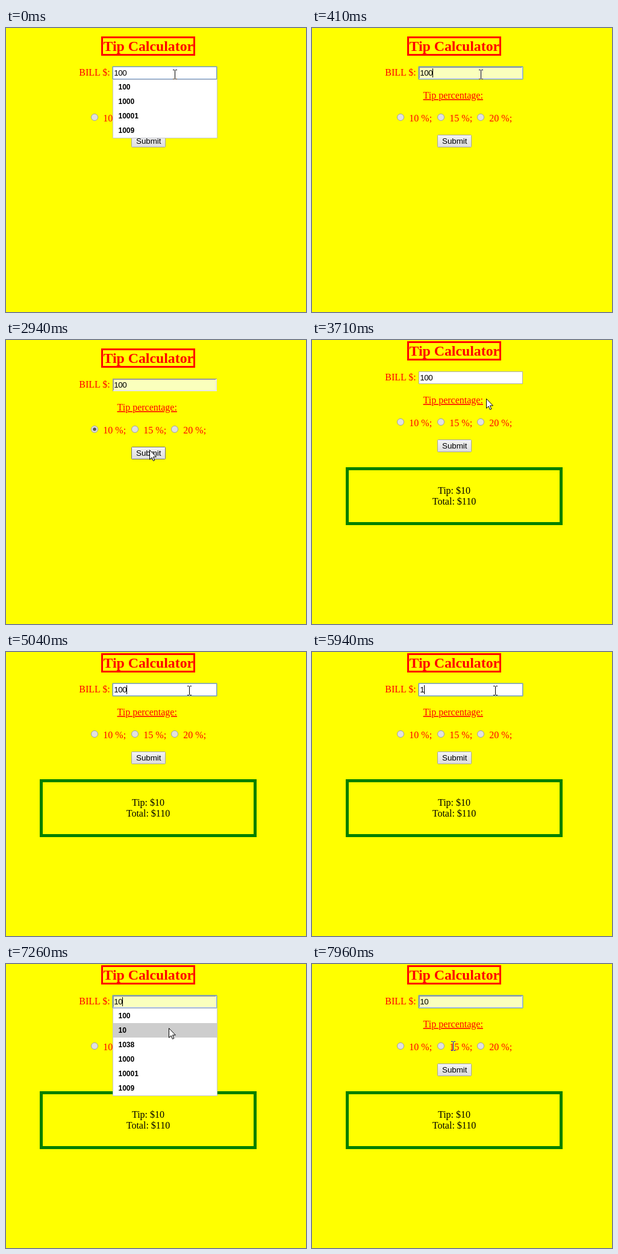
Recreate the animation shown at these times as an HTML page. Size 498x471 px, loop 8000 ms.

```html
<!DOCTYPE html>
<html lang="en">
<head>
<meta charset="utf-8">
<title>Tip Calculator</title>
<style>
  html, body { margin: 0; width: 100%; height: 100%; overflow: hidden; background: #ff0; }
  svg { display: block; isolation: isolate; }
  text { white-space: pre; }
  .serif { font: 16px "Liberation Serif", "Times New Roman", serif; fill: #f00; }
  .title { font-size: 23.8px; font-weight: bold; text-anchor: middle; }
  .dark { fill: #000; text-anchor: middle; }
  .sans { font: 13.33px "Liberation Sans", Arial, sans-serif; }
  .item { font-size: 12px; font-weight: bold; }
  #value { letter-spacing: -.4px; }
  #beam { mix-blend-mode: difference; }
</style>
</head>
<body>
<svg width="498" height="471" viewBox="0 0 498 471">
  <defs>
    <linearGradient id="face" x2="0" y2="1">
      <stop offset="0" stop-color="#f4f4f4"/><stop offset="1" stop-color="#dcdcdc"/>
    </linearGradient>
  </defs>
  <rect width="498" height="471" fill="#ff0"/>
  <g id="page">
    <rect x="159.5" y="15.5" width="153" height="29" fill="none" stroke="#f00" stroke-width="3"/>
    <text class="serif title" x="236.3" y="38">Tip Calculator</text>
    <text class="serif" x="121.3" y="79">BILL $:</text>
    <rect id="field" x="177.5" y="64.5" width="172" height="20" stroke="#a9abb2"/>
    <g id="inset" fill="none" stroke-width="2">
      <path d="M178 85V65H350" stroke="#9a9a9a"/>
      <path d="M178 84H349V65" stroke="#e8e8e4"/>
    </g>
    <g id="ring" fill="none" stroke="#5b94dc">
      <rect x="176.5" y="63.5" width="174" height="22" rx="1" stroke-opacity=".5"/>
      <rect x="177.5" y="64.5" width="172" height="20" stroke-opacity=".6"/>
    </g>
    <text id="value" class="sans" x="179.3" y="79"></text>
    <rect id="caret" y="67" width="1" height="15"/>
    <text class="serif" x="184.5" y="117" text-decoration="underline">Tip percentage:</text>
    <g id="radios"></g>
    <rect id="button" x="208.5" y="177.5" width="56" height="20" rx="1" fill="url(#face)"/>
    <text class="sans" x="216" y="192">Submit</text>
  </g>
  <g id="result">
    <rect x="58.5" y="213.5" width="355" height="91" fill="none" stroke="#008000" stroke-width="5"/>
    <text class="serif dark" x="236" y="255">Tip: $10</text>
    <text class="serif dark" x="236" y="273">Total: $110</text>
  </g>
  <g id="menu">
    <rect id="panel" x="177.5" y="85.5" width="173" fill="#fff" stroke="#c3c5cc"/>
    <rect id="mark" x="178" width="172" height="24" fill="#cdcdcd"/>
    <g id="items"></g>
  </g>
  <path id="beam" d="M-3.5 -7.5H-1L0 -6.5L1 -7.5H3.5M0 -7V7M-3.5 7.5H-1L0 6.5L1 7.5H3.5" fill="none" stroke="#fff"/>
  <path id="arrow" d="M.5 .5V16.2L4.1 12.8L6.4 18.4L8.8 17.4L6.5 11.9H11.4Z" fill="#fff" stroke="#000"/>
</svg>
<script>
const LOOP = 8000, TICK = 127.5, BLINK = 500, ROW = 24;
const $ = id => document.getElementById(id);
const show = (id, on) => $(id).setAttribute('visibility', on ? 'visible' : 'hidden');
const set = (id, attrs) => { for (const k in attrs) $(id).setAttribute(k, attrs[k]); };
const move = (id, x, y) => set(id, { transform: `translate(${x} ${y})` });

const TENS = ['1000', '10001', '1009'];
const closed = { list: [], pick: -1 };

// Each step changes only what it names; setting the value restarts the caret blink.
const steps = [
  [-600, { value: '100', list: ['100', ...TENS], pick: -1, focus: true,
           filled: false, checked: false, sent: false }],
  [130, { value: '100', filled: true, pick: 0 }],
  [410, closed],
  [2190, { checked: true, focus: false }],
  [3190, { sent: true, filled: false, checked: false }],
  [5040, { value: '100', focus: true }],
  [5190, { list: ['100', ...TENS] }],
  [5940, { value: '1', ...closed }],
  [6070, { list: ['100', '10', '1038', '1000', '12345678', '10001'] }],
  [6220, { value: '10', list: ['100', '10', '1038', ...TENS] }],
  [6870, { value: '100', filled: true, pick: 0 }],
  [7260, { value: '10', pick: 1 }],
  [7560, closed]
];

// Where the pointer rests or turns: time, x, y
const path = [
  [0, 280, 77], [800, 280, 77], [1200, 100, 202], [1450, 95, 195], [2030, 145, 147],
  [2300, 145, 147], [2900, 238, 182], [3500, 238, 182], [3800, 315, 53], [3940, 332, 43],
  [4450, 302, 77], [4700, 304, 64], [6500, 304, 64], [6630, 300, 69],
  [7200, 267, 110], [7700, 267, 110], [7900, 234, 136]
];

const radios = [10, 15, 20].map((n, i) => ({ n, x: Math.round(147 + i * 66.5) }));
$('radios').innerHTML = radios.map(({ n, x }) =>
  `<circle cx="${x}" cy="148" r="5.5" fill="#e0e0e0" stroke="#a0a0a0"/>
   <text class="serif" x="${x + 14.3}" y="155">${n} %;</text>`
).join('') + '<circle id="dot" cx="147" cy="148" r="2.8" fill="#555"/>';

function pointerAt(t) {
  const i = path.findIndex(p => p[0] > t);
  if (i < 0) return path[path.length - 1].slice(1);
  const [t0, x0, y0] = path[i - 1], [t1, x1, y1] = path[i];
  const k = (t - t0) / (t1 - t0);
  return [Math.round(x0 + (x1 - x0) * k), Math.round(y0 + (y1 - y0) * k)];
}

function drawMenu({ list, pick }, lift) {
  move('menu', 0, -lift);
  show('menu', list.length);
  show('mark', pick >= 0);
  set('panel', { height: list.length * ROW + 1 });
  set('mark', { y: 86 + pick * ROW });
  $('items').innerHTML = list.map((s, i) =>
    `<text class="sans item" x="186.5" y="${102 + i * ROW}">${s}</text>`).join('');
}

function drawPointer(x, y, lift) {
  const over = (left, top, w, h) =>
    x >= left && x < left + w && y + lift >= top && y + lift < top + h;
  const onText = over(177, 64, 173, 21) || radios.some(r => over(r.x + 14, 143, 38, 14));
  show('beam', onText);
  show('arrow', !onText);
  move('beam', x + .5, y);
  move('arrow', x, y);
  set('button', { stroke: over(208, 177, 57, 21) ? '#707070' : '#a3a3a3' });
}

function draw(t) {
  const done = steps.filter(s => s[0] <= t);
  const s = Object.assign({}, ...done.map(d => d[1]));
  const woke = done.filter(d => 'value' in d[1]).pop()[0];
  const lift = s.sent ? 12 : 0;
  move('page', 0, -lift);
  set('field', { fill: s.filled ? '#faffbd' : '#fff' });
  set('caret', { x: 179 + 7 * s.value.length });
  $('value').textContent = s.value;
  show('inset', s.filled);
  show('ring', s.focus);
  show('caret', s.focus && (t - woke) % (2 * BLINK) < BLINK);
  show('dot', s.checked);
  show('result', s.sent);
  drawMenu(s, lift);
  drawPointer(...pointerAt(Math.floor(t / TICK) * TICK), lift);
}

const start = performance.now();
function frame() {
  draw((performance.now() - start) % LOOP);
  requestAnimationFrame(frame);
}
frame();
</script>
</body>
</html>
```
